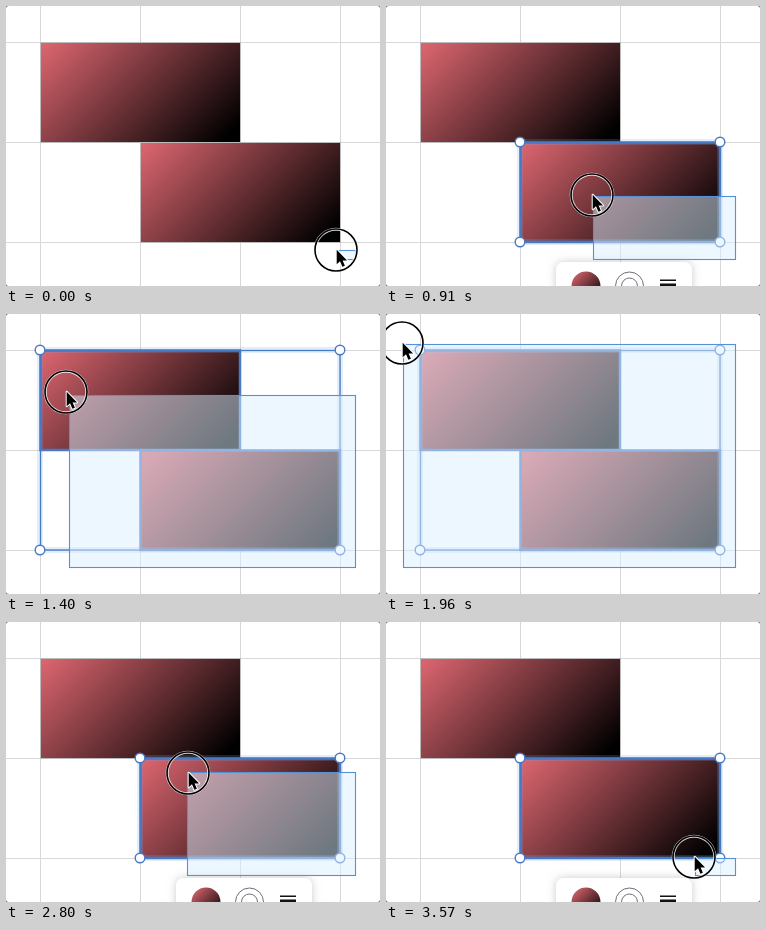
Animation of 374 by 280 pixels, one loop 3640 ms. Source, as an HTML page with a canvas:

```html
<!DOCTYPE html>
<html lang="en">
<head>
<meta charset="utf-8">
<title>Marquee selection</title>
<style>
  html, body { margin: 0; width: 100%; height: 100%; overflow: hidden; background: #fff; }
  canvas { display: block; width: 374px; height: 280px; }
</style>
</head>
<body>
<canvas id="stage" width="374" height="280"></canvas>
<script>
const ctx = document.getElementById('stage').getContext('2d');
const W = 374, H = 280, LOOP = 3640, STEP = 70;
const BLUE = '#4779c6';
const ANCHOR = { x: 350, y: 254 };
const CELLS = [
  { x: 34, y: 36, w: 200, h: 100 },
  { x: 134, y: 136, w: 200, h: 100 }
];

// time, marquee corner x, y, pointer offset from that corner
const PATH = [
  [0, 330, 244, 0],
  [910, 207, 190, -1],
  [1120, 130, 132, -3],
  [1400, 63, 81, -3],
  [1680, 30, 41, -2],
  [1960, 17, 30, -1],
  [2030, 17, 30, -1],
  [2450, 102, 86, 4],
  [2800, 181, 150, 1],
  [3570, 309, 236, -1]
];

function slope(i, k) {
  if (i === 0 || i === PATH.length - 1) return 0;
  const rate = j => (PATH[j + 1][k] - PATH[j][k]) / (PATH[j + 1][0] - PATH[j][0]);
  const a = rate(i - 1), b = rate(i);
  return a * b > 0 ? 2 * a * b / (a + b) : 0;
}

// Monotone cubic through the path points
function sample(t, k) {
  let i = 0;
  while (i < PATH.length - 2 && t >= PATH[i + 1][0]) i++;
  const p = PATH[i], q = PATH[i + 1], span = q[0] - p[0];
  const s = Math.min(1, (t - p[0]) / span), r = 1 - s;
  return p[k] * (1 + 2 * s) * r * r + q[k] * s * s * (3 - 2 * s)
    + span * s * r * (slope(i, k) * r - slope(i + 1, k) * s);
}

function strokeBox(x, y, w, h, color, width) {
  ctx.strokeStyle = color;
  ctx.lineWidth = width;
  ctx.strokeRect(x, y, w, h);
}

function disc(x, y, r, fill, stroke, width) {
  ctx.beginPath();
  ctx.arc(x, y, r, 0, Math.PI * 2);
  if (fill) { ctx.fillStyle = fill; ctx.fill(); }
  if (stroke) { ctx.strokeStyle = stroke; ctx.lineWidth = width; ctx.stroke(); }
}

function diagonal(x, y, size, end) {
  const g = ctx.createLinearGradient(x, y, x + size, y + size);
  g.addColorStop(0, '#df6771');
  g.addColorStop(end, '#000');
  return g;
}

function drawBoard() {
  ctx.fillStyle = '#fff';
  ctx.fillRect(0, 0, W, H);
  ctx.fillStyle = '#d8d8d8';
  for (let x = 34; x < W; x += 100) ctx.fillRect(x, 0, 1, H);
  for (let y = 36; y < H; y += 100) ctx.fillRect(0, y, W, 1);
  for (const c of CELLS) {
    strokeBox(c.x + .5, c.y + .5, c.w, c.h, '#bdbabb', 1);
    ctx.fillStyle = diagonal(c.x, c.y, 150, .94);
    ctx.fillRect(c.x + 1, c.y + 1, c.w - 1, c.h - 1);
  }
}

function drawSelection(cells) {
  const x = Math.min(...cells.map(c => c.x)), y = Math.min(...cells.map(c => c.y));
  const w = Math.max(...cells.map(c => c.x + c.w)) - x;
  const h = Math.max(...cells.map(c => c.y + c.h)) - y;
  strokeBox(x, y, w, h, 'rgba(110,170,240,.2)', 6);
  for (const c of cells) strokeBox(c.x + .5, c.y + .5, c.w - .5, c.h - .5, BLUE, 2.5);
  strokeBox(x + .5, y + .5, w - .5, h - .5, BLUE, 1.3);
  for (const hx of [x, x + w])
    for (const hy of [y, y + h]) disc(hx, hy, 4.8, '#fff', BLUE, 1.4);
}

function drawToolbar() {
  ctx.save();
  ctx.shadowColor = 'rgba(0,0,0,.2)';
  ctx.shadowBlur = 8;
  ctx.fillStyle = '#fff';
  ctx.beginPath();
  ctx.roundRect(170, 256, 136, 50, 7);
  ctx.fill();
  ctx.restore();
  disc(200, 280, 14.5, diagonal(187, 266, 27, 1));
  disc(243.5, 280, 14, null, '#6c7078', 1);
  disc(243.5, 280, 8, null, '#6c7078', 1);
  ctx.fillStyle = '#111';
  ctx.fillRect(274, 273.5, 16, 1.5);
  ctx.fillRect(274, 277.5, 16, 2.5);
}

function drawMarquee(x, y) {
  ctx.fillStyle = 'rgba(220,240,255,.5)';
  ctx.fillRect(x, y, ANCHOR.x - x, ANCHOR.y - y);
  strokeBox(x + .5, y + .5, ANCHOR.x - x - 1, ANCHOR.y - y - 1, '#5591d8', 1.1);
}

function drawPointer(x, y) {
  disc(x, y, 20.8, null, 'rgba(255,255,255,.8)', 3);
  disc(x, y, 21, null, '#000', 1.6);
  const outline = [[0, 0], [0, 14.5], [3.3, 11.5], [5.7, 17], [8.2, 16], [5.9, 10.6], [10.4, 10.6]];
  ctx.beginPath();
  for (const [px, py] of outline) ctx.lineTo(x + px + .7, y + py - .2);
  ctx.closePath();
  ctx.lineJoin = 'round';
  ctx.strokeStyle = '#fff';
  ctx.lineWidth = 2;
  ctx.stroke();
  ctx.fillStyle = '#000';
  ctx.fill();
  ctx.lineJoin = 'miter';
}

function drawCorners() {
  ctx.beginPath();
  ctx.rect(0, 0, W, H);
  ctx.roundRect(0, 0, W, H, 3);
  ctx.fillStyle = '#777';
  ctx.fill('evenodd');
}

function render(t) {
  const x = Math.round(sample(t, 1)), y = Math.round(sample(t, 2)), offset = sample(t, 3);
  const selected = CELLS.filter(c => x <= c.x + c.w && y <= c.y + c.h);
  drawBoard();
  if (selected.length) drawSelection(selected);
  if (selected.length === 1) drawToolbar();
  drawMarquee(x, y);
  drawPointer(x + offset, y + offset);
  drawCorners();
}

const start = performance.now();
function tick() {
  const t = (performance.now() - start) % LOOP;
  render(Math.floor(t / STEP) * STEP);
  requestAnimationFrame(tick);
}
tick();
</script>
</body>
</html>
```
